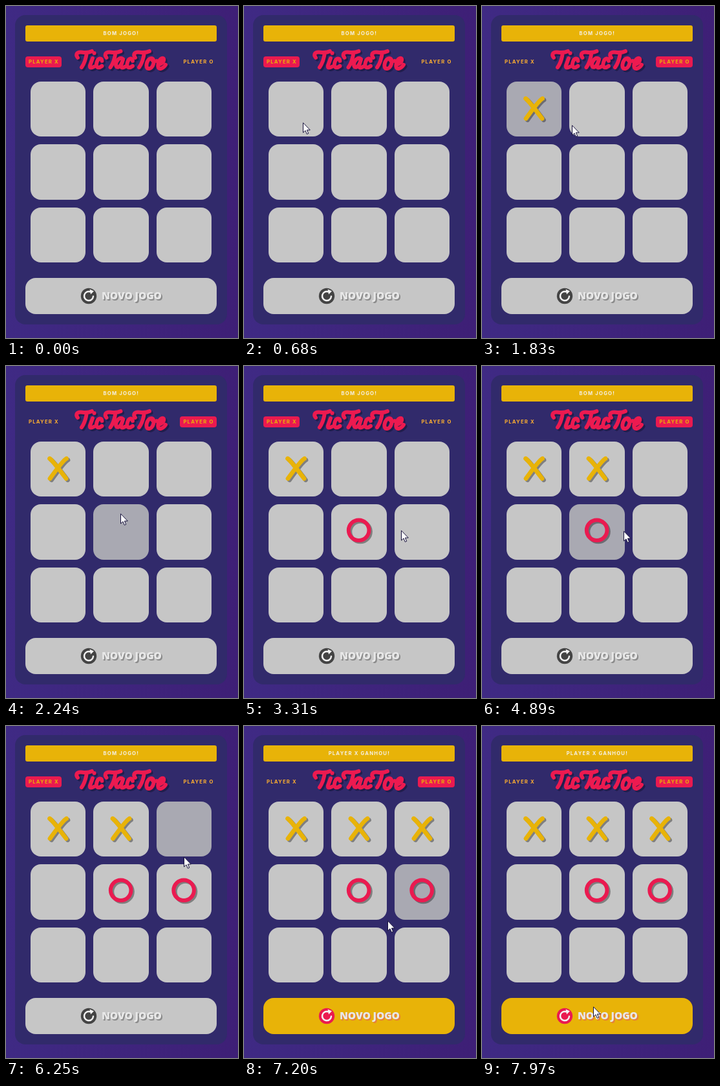
These frames come from a looping animation (359x514 px, 8 s). An HTML page:

```html
<!DOCTYPE html>
<html lang="pt">
<head>
<meta charset="utf-8">
<style>
  html, body { margin: 0; width: 100%; height: 100%; overflow: hidden; background: #3e2380; }
  svg { display: block; width: 359px; height: 514px; }
  .small { font: 700 7.7px Inter, sans-serif; letter-spacing: 1.2px; text-anchor: middle; }
  .big { font: 800 15.5px "Open Sans", sans-serif; letter-spacing: -.1px; }
  .line { fill: none; stroke-linecap: round; stroke-linejoin: round; }
</style>
</head>
<body>
<svg viewBox="0 0 359 514">
  <defs>
    <linearGradient id="sky">
      <stop stop-color="#3f2a84"/><stop offset="1" stop-color="#3e1f76"/>
    </linearGradient>
    <path id="T" d="M4 14C0 9 3 5 9 5.500S20 7 26 4M18 6C17 14 15 22 10 29"/>
    <path id="c" d="M10 4C10-1 4-1 2 6S3 17 10 12"/>
    <g id="title" class="line" stroke-width="6">
      <use href="#T" x="107" y="66"/><use href="#T" x="151.500" y="66"/><use href="#T" x="196" y="66"/>
      <path d="M134 81L130 92Q129 98 136 94M136.500 73h.1"/>
      <use href="#c" x="138.500" y="81"/><use href="#c" x="186" y="81"/>
      <path d="M181 82C176 78 170 85 170 91S177 97 181 83L178 92Q178 98 184 94"/>
      <path d="M225 81C218 81 214 97 221 97S232 82 225 81Q227 87 233 85"/>
      <path d="M236 91C246 88 246 79 241 81S232 97 239 97Q244 96 247 91"/>
    </g>
    <path id="X" class="line" stroke-width="6.800" d="M-13-15.500Q-9-13 12.500 15.500M13-15.500Q8-13-12.500 15.500"/>
    <circle id="O" class="line" stroke-width="6" cx="-.4" cy="-2" r="15.800"/>
  </defs>
  <rect width="359" height="514" fill="url(#sky)"/>
  <rect x="14" y="14" width="328" height="479" rx="16" fill="#312a6b"/>
  <rect x="30" y="30" width="296" height="25" rx="3" fill="#e8b308"/>
  <text id="message" class="small" x="178.300" y="45.200" fill="#f4f0e6"/>
  <g id="players"></g>
  <use href="#title" x="2.500" y="2.500" stroke="#211d4c"/>
  <use href="#title" stroke="#ec1a50"/>
  <g id="board"></g>
  <rect id="button" x="30" y="421" width="296" height="56" rx="16"/>
  <circle id="icon" cx="128" cy="449" r="12.200"/>
  <path class="line" stroke="#f4f4f4" stroke-width="2.500" d="M135 449.500A7 7 0 1 1 130 442.300"/>
  <path fill="#f4f4f4" d="M129.500 438.500L136 441.500L131 446.500z"/>
  <text id="labelShadow" class="big" x="149.800" y="455.800">NOVO JOGO</text>
  <text class="big" x="148" y="454" fill="#e8e8e8">NOVO JOGO</text>
  <g id="cursor">
    <circle id="ring" r="12" fill="#ff0" fill-opacity=".47"/>
    <path d="M.5.8V16L4 12.800L6.300 18.300L8.700 17.300L6.400 12H11.300Z" fill="#fff" stroke="#15103a"/>
  </g>
</svg>
<script>
const LOOP = 8000, STEP = 70, CLICK = 200;
const PITCH = 97.5, SIZE = 85.3, LEFT = 37.9, TOP = 116.9;
const RED = '#ea1a50', GOLD = '#e8b308', GREY = '#c6c6c6', HOVER = '#a9a9b2';
const $ = id => document.getElementById(id);

function add(parent, tag, attrs, text = '') {
  const el = document.createElementNS('http://www.w3.org/2000/svg', tag);
  for (const key in attrs) el.setAttribute(key, attrs[key]);
  el.textContent = text;
  return parent.appendChild(el);
}

const turns = [
  { click: 1090, cell: 0 }, { click: 2710, cell: 4 }, { click: 4470, cell: 1 },
  { click: 5370, cell: 5 }, { click: 6580, cell: 2 }
];

// Each move curves past `via` and slows down towards `to`.
const entry = [320, 540];
const moves = [
  { start: 260, end: 820, via: [200, 350], to: [79, 161] },
  { start: 1690, end: 2310, via: [147, 171], to: [178, 229] },
  { start: 3240, end: 3930, via: [335, 295], to: [138, 190] },
  { start: 4000, end: 4270, via: [160, 186], to: [147, 194] },
  { start: 4820, end: 5170, via: [221, 271], to: [262, 268] },
  { start: 5900, end: 6250, via: [282, 185], to: [275, 202] },
  { start: 7130, end: 7970, via: [165, 400], to: [172, 434] }
];

const cellX = i => LEFT + i % 3 * PITCH;
const cellY = i => TOP + Math.floor(i / 3) * PITCH;

const players = ['X', 'O'].map((name, i) => {
  const x = i ? 269 : 30, width = i ? 57 : 56;
  const box = add($('players'), 'rect', { x, y: 78, width, height: 17, rx: 4, fill: RED });
  const text = add($('players'), 'text', { class: 'small', x: x + width / 2 + .5, y: 89.3 }, 'PLAYER ' + name);
  return { box, text };
});

const cells = Array.from({ length: 9 }, (_, i) => {
  const [x, y, right, bottom] = [cellX(i), cellY(i), cellX(i) + SIZE, cellY(i) + SIZE].map(Math.round);
  return add($('board'), 'rect', { x, y, width: right - x, height: bottom - y, rx: 16 });
});

const marks = turns.map(({ cell }, i) => {
  const x = cellX(cell) + SIZE / 2, y = cellY(cell) + SIZE / 2 - .8;
  const mark = add($('board'), 'g', { transform: `translate(${x} ${y})` });
  const href = i % 2 ? '#O' : '#X';
  add(mark, 'use', { href, x: 2.4, y: 2.2, stroke: '#000', 'stroke-opacity': .36 });
  add(mark, 'use', { href, stroke: i % 2 ? RED : GOLD });
  return mark;
});

function mouseAt(t) {
  const index = moves.findLastIndex(move => t >= move.start);
  if (index < 0) return null;
  const { start, end, via, to } = moves[index];
  const from = index ? moves[index - 1].to : entry;
  const gaps = Math.round((end - start) / STEP);
  const step = Math.min(gaps, Math.floor((t - start) / (end - start) * gaps + .05));
  const u = 1 - (1 - (step + 1) / (gaps + 1)) ** 2;
  return [0, 1].map(i => Math.round((1 - u) ** 2 * from[i] + 2 * u * (1 - u) * via[i] + u * u * to[i]));
}

function isOver(point, i) {
  if (!point) return false;
  const x = point[0] - cellX(i), y = point[1] - cellY(i);
  return x >= 0 && x <= SIZE && y >= 0 && y <= SIZE;
}

function show(el, visible) {
  el.style.display = visible ? '' : 'none';
}

function render(t) {
  const played = turns.filter(({ click }) => t >= click + CLICK).length;
  const won = played === turns.length;
  const mouse = mouseAt(t);
  const lateMouse = mouseAt(t - STEP); // hover trails the pointer by one step

  $('message').textContent = won ? 'PLAYER X GANHOU!' : 'BOM JOGO!';
  players.forEach(({ box, text }, i) => {
    const active = played % 2 === i;
    show(box, active);
    text.setAttribute('fill', active ? GOLD : '#ffb030');
  });
  cells.forEach((cell, i) => cell.setAttribute('fill', isOver(lateMouse, i) ? HOVER : GREY));
  marks.forEach((mark, i) => show(mark, i < played));
  $('button').setAttribute('fill', won ? GOLD : GREY);
  $('icon').setAttribute('fill', won ? RED : '#444');
  $('labelShadow').setAttribute('fill', won ? '#e5803c' : '#8b8b8b');

  show($('cursor'), mouse);
  if (mouse) $('cursor').setAttribute('transform', `translate(${mouse})`);
  show($('ring'), turns.some(({ click }) => t >= click && t < click + CLICK));
}

function tick() {
  render(performance.now() % LOOP);
  requestAnimationFrame(tick);
}
tick();
</script>
</body>
</html>
```
